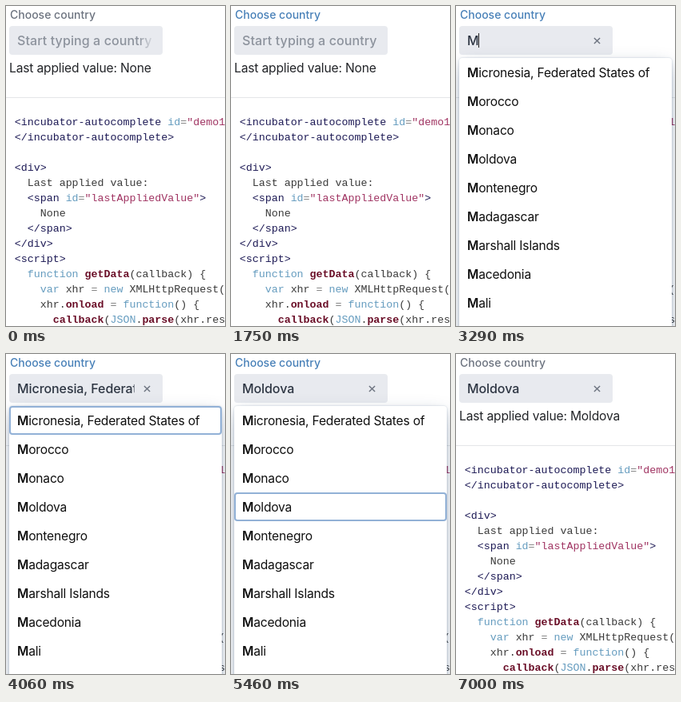
Animation of 274x400 px, one loop 7.14 s. Source, as an HTML page with a canvas:

```html
<!DOCTYPE html>
<html lang="en">
<head>
<meta charset="utf-8">
<title>Country autocomplete</title>
<style>
  html, body { margin: 0; width: 100%; height: 100%; overflow: hidden; background: #fff; }
  canvas { display: block; width: 274px; height: 400px; }
</style>
</head>
<body>
<canvas id="stage"></canvas>
<script>
const W = 274, H = 400, LOOP = 7140;
const canvas = document.getElementById('stage');
const ctx = canvas.getContext('2d');
const dpr = window.devicePixelRatio || 1;
canvas.width = W * dpr;
canvas.height = H * dpr;

const SANS = 'Inter, "Noto Sans", sans-serif';
const MONO = '"Liberation Mono", monospace';
const CODE_SIZE = 13.3;
const FIELD = { x: 4, y: 25, w: 192, h: 36 };
const LIST = { x: 4, y: 65, w: 266, h: 400, row: 36 };
const GREY = [108, 115, 127], DARK = [45, 52, 65], BLUE = [72, 128, 184];
const VALUE = '#2d3542';

const COUNTRIES = ['Micronesia, Federated States of', 'Morocco', 'Monaco', 'Moldova',
  'Montenegro', 'Madagascar', 'Marshall Islands', 'Macedonia', 'Mali'];

// Moments of the interaction, in ms
const HOVER = 720, FOCUS = 1130, TYPE = 2100, OPEN = 2130, PICK = 4060, PICK_STEP = 280;
const CLOSE = 5580, BLUR = 5640, LEAVE = 6430;

// Code tokens: t tag, a attribute or keyword, s string, f function name, p plain, o operator
const STYLES = { t: '#1d1a55', a: '#659cbf', s: '#a03462', f: '#6a0e27', p: '#3a3a3a', o: '#808080' };
const CODE = [
  [0, 't<incubator-autocomplete ', 'aid', 'o=', 's"demo1"'],
  [0, 't</incubator-autocomplete>'],
  [0],
  [0, 't<div>'],
  [2, 'pLast applied value:'],
  [2, 't<span ', 'aid', 'o=', 's"lastAppliedValue"', 't>'],
  [4, 'pNone'],
  [2, 't</span>'],
  [0, 't</div>'],
  [0, 't<script>'],
  [2, 'afunction ', 'fgetData', 'p(callback) {'],
  [4, 'avar ', 'pxhr ', 'o= ', 'anew ', 'pXMLHttpRequest('],
  [4, 'pxhr.', 'fonload ', 'o= ', 'afunction', 'p() {'],
  [6, 'fcallback', 'p(', 'aJSON', 'p.', 'fparse', 'p(xhr.responseText']
];

const clamp = v => Math.max(0, Math.min(1, v));
const progress = (t, start, length) => clamp((t - start) / length);
const ease = v => 1 - (1 - v) ** 2;
const mix = (a, b, k) => a.map((v, i) => v + (b[i] - v) * k);
const rgb = c => `rgb(${c.map(Math.round).join(',')})`;

function text(str, x, y, { size = 16, weight = 400, color = VALUE, family = SANS, spacing = 0 } = {}) {
  ctx.font = `${weight} ${size}px ${family}`;
  ctx.letterSpacing = spacing + 'px';
  ctx.fillStyle = color;
  ctx.fillText(str, x, y);
  return ctx.measureText(str).width;
}

function box(x, y, w, h, r) {
  ctx.beginPath();
  ctx.roundRect(x, y, w, h, r);
}

function clipTo(x, y, w, h, r, draw) {
  ctx.save();
  box(x, y, w, h, r);
  ctx.clip();
  draw();
  ctx.restore();
}

function drawCode() {
  CODE.forEach(([indent, ...tokens], i) => {
    let x = 10.8 + indent * CODE_SIZE * 0.6;
    for (const token of tokens) {
      const kind = token[0];
      x += text(token.slice(1), x, 149 + i * 19, {
        size: CODE_SIZE, family: MONO, color: STYLES[kind], weight: kind === 'f' ? 700 : 400
      });
    }
  });
}

function labelColor(t) {
  let color = GREY;
  for (const [start, next] of [[HOVER, DARK], [FOCUS, BLUE], [BLUR, DARK], [LEAVE, GREY]]) {
    color = mix(color, next, ease(progress(t, start, 200)));
  }
  return rgb(color);
}

function pickedIndex(t) {
  return t < PICK ? -1 : Math.min(3, Math.floor((t - PICK) / PICK_STEP));
}

function fieldValue(t) {
  if (t < TYPE) return '';
  return t < PICK ? 'M' : COUNTRIES[pickedIndex(t)];
}

function caretVisible(t) {
  if (t < FOCUS || t >= BLUR) return false;
  if (t < TYPE) return t < 1680;
  if (t < PICK) return t < 2730 || (t >= 3290 && t < 3780);
  return t < 5460;
}

function drawShade(t) {
  const { x, y, w, h } = FIELD;
  const opacity = t < BLUR
    ? ease(progress(t, HOVER, 200))
    : ease(progress(t, BLUR, 200)) * (1 - ease(progress(t, LEAVE, 200)));
  const scale = t < BLUR
    ? 1 - ease(progress(t, FOCUS, 150))
    : ease(progress(t, BLUR, 150));
  ctx.fillStyle = `rgba(60,62,85,${0.06 * opacity})`;
  ctx.fillRect(x + w * (1 - scale), y, w * scale, h);
}

function placeholderFill(masked) {
  if (!masked) return '#8c929c';
  const fade = ctx.createLinearGradient(166, 0, 187, 0);
  fade.addColorStop(0, 'rgba(140,146,156,1)');
  fade.addColorStop(1, 'rgba(140,146,156,0)');
  return fade;
}

function drawClear() {
  ctx.strokeStyle = '#6c737f';
  ctx.lineWidth = 1.4;
  ctx.beginPath();
  for (const s of [-1, 1]) {
    ctx.moveTo(176.5 - 3.6, 43.5 - 3.6 * s);
    ctx.lineTo(176.5 + 3.6, 43.5 + 3.6 * s);
  }
  ctx.stroke();
}

function drawField(t) {
  const { x, y, w, h } = FIELD;
  const value = fieldValue(t);
  clipTo(x, y, w, h, 4, () => {
    ctx.fillStyle = '#e8eaef';
    ctx.fillRect(x, y, w, h);
    drawShade(t);
  });
  const right = value ? 160.5 : 187;
  clipTo(13, y, right - 13, h, 0, () => {
    let end = 14;
    if (value) end += text(value, 14, 49, { weight: 500, spacing: -0.08 });
    else text('Start typing a country', 14, 49, { weight: 500, color: placeholderFill(t < FOCUS), spacing: 0.1 });
    if (caretVisible(t)) {
      ctx.fillStyle = '#222';
      ctx.fillRect(Math.floor(end), 34, 1, 18);
    }
  });
  if (value) drawClear();
}

function castShadow(offset, blur, spread, alpha) {
  const { x, y, w, h } = LIST;
  ctx.save();
  ctx.shadowColor = `rgba(26,57,96,${alpha})`;
  ctx.shadowBlur = blur * dpr;
  ctx.shadowOffsetY = offset * dpr;
  ctx.fillStyle = '#fff';
  box(x - spread, y - spread, w + 2 * spread, h + 2 * spread, 4);
  ctx.fill();
  ctx.restore();
}

function drawList(t) {
  if (t < OPEN || t >= CLOSE + 100) return;
  const { x, y, w, h, row } = LIST;
  const enter = ease(progress(t, OPEN, 100));
  ctx.save();
  ctx.globalAlpha = enter * (1 - progress(t, CLOSE, 100));
  ctx.translate(0, -4 * (1 - enter));
  castShadow(8, 24, -4, 0.36);
  castShadow(2, 6, -1, 0.2);
  ctx.fillStyle = 'rgba(26,57,96,0.06)';
  box(x - 1, y - 1, w + 2, h + 2, 5);
  ctx.fill();
  ctx.fillStyle = '#fff';
  box(x, y, w, h, 4);
  ctx.fill();

  const style = { size: 15.6, color: '#101010', spacing: -0.2 };
  COUNTRIES.forEach((name, i) => {
    const base = y + 24 + i * row;
    const initial = text(name[0], 14, base, { ...style, weight: 600 });
    text(name.slice(1), 14 + initial, base, style);
  });

  const picked = pickedIndex(t);
  if (picked >= 0) {
    ctx.strokeStyle = '#92b1d6';
    ctx.lineWidth = 2;
    box(x + 1, y + 1 + picked * row, w - 2, row - 2, 3);
    ctx.stroke();
  }
  ctx.restore();
}

function draw(t) {
  ctx.setTransform(dpr, 0, 0, dpr, 0, 0);
  ctx.fillStyle = '#fff';
  ctx.fillRect(0, 0, W, H);
  ctx.fillStyle = '#e4e6e8';
  ctx.fillRect(0, 114, W, 1);
  text('Choose country', 5, 16, { size: 14, weight: 500, color: labelColor(t) });
  const applied = t < CLOSE ? 'None' : 'Moldova';
  text('Last applied value: ' + applied, 4, 83, { size: 15.6, color: '#222428', spacing: -0.16 });
  drawCode();
  drawField(t);
  drawList(t);
}

const began = performance.now();
function tick() {
  draw((performance.now() - began) % LOOP);
  requestAnimationFrame(tick);
}
tick();
</script>
</body>
</html>
```
